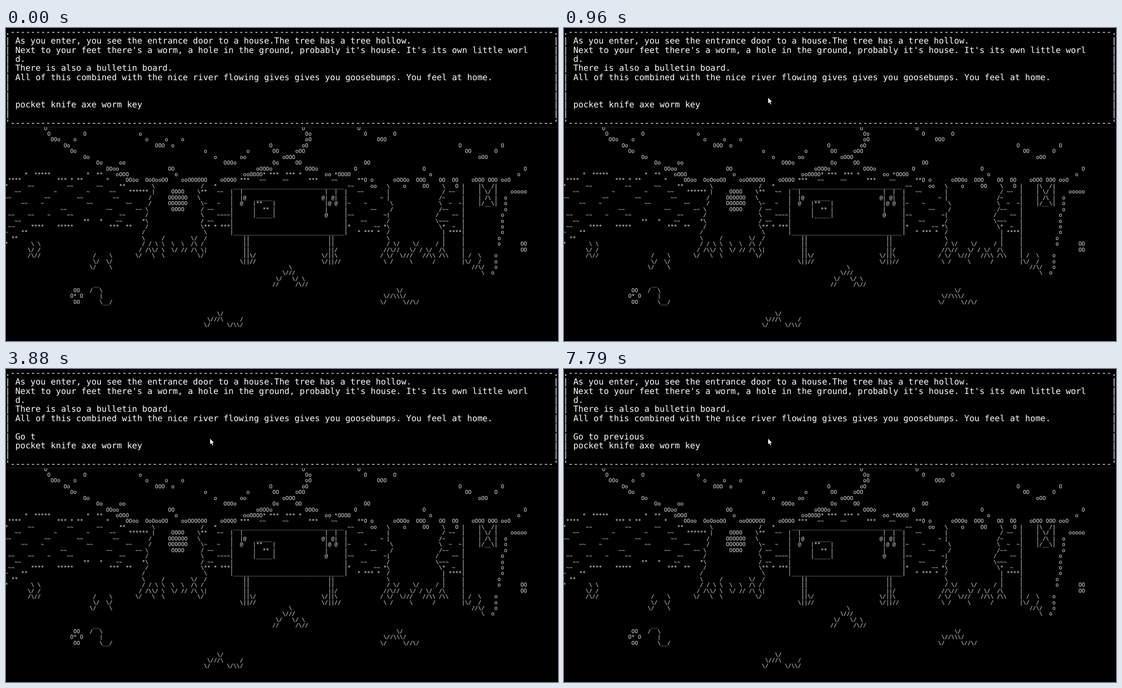
Animation, 993 px wide and 564 px high, one loop 8000 ms. Source, as an HTML page:

```html
<!DOCTYPE html>
<html lang="en">
<head>
<meta charset="utf-8">
<title>Text adventure</title>
<style>
  html, body { margin: 0; width: 100%; height: 100%; overflow: hidden; background: #000; }
  #stage { position: relative; width: 993px; height: 564px; overflow: hidden; background: #000; }
  pre {
    position: absolute; margin: 0; white-space: pre;
    font-family: "DejaVu Sans Mono", monospace;
    font-variant-ligatures: none; text-rendering: geometricPrecision;
  }
  #story { left: -1.6px; top: -1.2px; font-size: 15.18px; line-height: 16.4px; color: #fff; }
  #view { position: absolute; left: 0; top: 178px; width: 993px; height: 386px; overflow: hidden; border-top: 1px solid #222; box-sizing: border-box; }
  #scene { left: -2px; top: -2.5px; font-size: 9.763px; line-height: 10.44px; color: #e4e4e4; }
  #pointer { position: absolute; left: 0; top: 0; overflow: visible; visibility: hidden; }
</style>
</head>
<body>
<div id="stage">
  <pre id="story"></pre>
  <div id="view">
<pre id="scene">
^  O^^^^^^^^ O^        O
^   O^    O^^ o^^^^^  Oo^^O        O
^    OOo^ o^^   o     o    o^^^^  oO^^    OOO
^        Oo^^      OOO^ o^^^ O^ oO^^^^         O^  O
^^Oo^^^^ o^    o^  OO     oOO^^^^^ OO^O
^^    Oo^^^^    o^  oo^     oOOO^^^^^^     oOO
^^        Oo     oo^^^       OOOo^  Oo     OO^^OO
^^^ OOoo^^OO^^       oOOOo^  OOOo^       O^^        O^^^         O
      *  *****^     *  **    oOOO^^  o^^   ooOOOO* ***  ***^*       oo *OOOO^^^o^^       o
 ****^      *** * **^ *     OOoo  OoOooOO    ooOOOOOO    oOOOO ***   ~~     ~~^   ***^~~      **O o      oOOOo  OOO^   OO  OO^   oOOO OOO ooO
*      ~~^         ~~       ~~     **^     \^^/   *^__________________________________ ~~^  oo   \^  o     OO    \   O^|    |\  /|
   ~~^     ~^     ~^  ~~    ****** |^ OOOO    \**   ~~  |  |^^        |^ |  |   ~~       |^^    / ~~^|    | \/ |    ooooo
~~^  ~~^  ~~^   ~~^    /^OOOOOO   \         |  |@   _____^       @|^@|  |^     ~ |^^   /~^|    | /\ |  o
     ~~^ ~^     ~~^       ~~^    /^OOOOOO^\~   ~   |  @   |**^  |^        |@ @  |~^~       \^^   \  ~  ~|    |/__\|  o
^       ~~^^ ~~^~~ \^ OOOO^/ ~~     |      |  ** |^        |^    |^  ~~    /^^   /~~^|^   o
 ~~    ~~^   ~     ~~^     ~~^   /^^\    ~~~~|      |_____|^        @^    |~~^      ~|^^  /    ~~^|^  o
   ~~^^    **   *    ~~^  *\^^/ ~~     |^^^    |    ~~      /^^  \~~~^|^  o
 ~~     ****    *****^  ***  **^   /^^\** * ***|^^^    |*^   ~~ *\^^   \*  ~^|^  o
~    **^^^^  /^^ \       |__________________________________|   *^*** *  /^^    | ****|^  o
  **^^^^  \     /^       \/^ /^   ||^^         ||^       \^^    |^|^ o
*       \^\^^^  / / \ \^ \  \  /\^/^   ||^^         ||^       / \/    \/^  / |^|^ o      OO
       \/ /^^^ / /\\/ \^ \/ // /\^\|^   ||^^         ||/^      //\//   \/ / \/  /\^|^        OO
       /\//^       /^  \^\/   \  \^         \/^   ||\/^^       \/||\^     / \/^ \///   //\\ /\\^| /  \^o
^^       \/^ \/^^^^  \||//^^       \/||//^      \ /^    \^ /^|\/  /^o
^^      \/^  \^^^^^       \^^^^^^   //\/^o
^^^^^^^^     \///^^^^^^      \  o
^^^^^^^^   \/   \/ \
^^       __^^^^^^  //     /\//
^^ OO   /  \^^^^^^^^^\/
^^O* O     |^^^^^^^^      \//\\\/
^^ OO      \__/^^^^^^^^     \/^  \//\/

^^^^^^     \/
^^^^^^  \///\^  /
^^^^^^ \/     \/\\/
</pre>
  </div>
  <svg id="pointer" width="10" height="15" viewBox="0 0 10 15">
    <path d="M0 0V11.2L2.5 9L4.2 13L6.1 12.2L4.4 8.3H7.6Z" fill="#fff" stroke="#000" stroke-width=".6"/>
  </svg>
</div>
<script>
const LOOP = 8000;
const $ = id => document.getElementById(id);
const story = $('story'), scene = $('scene'), pointer = $('pointer');

// "^" jumps to the next column that is a multiple of ten
const expand = line => [...line].reduce((out, ch) =>
  ch === '^' ? out.padEnd((Math.floor(out.length / 10) + 1) * 10) : out + ch, '');
scene.textContent = scene.textContent.split('\n').map(expand).join('\n');

const command = 'Go to previous t';
// time at which each count of typed characters is reached
const typing = [
  [2540, 1], [3090, 2], [3880, 4], [4010, 5], [4610, 7], [4810, 8], [5010, 9],
  [5340, 10], [5540, 11], [5740, 12], [5940, 13], [6070, 14], [6470, 16], [7790, 14]
];

function box(typed) {
  const rule = '-'.repeat(107);
  const lines = [
    'As you enter, you see the entrance door to a house.The tree has a tree hollow.',
    "Next to your feet there's a worm, a hole in the ground, probably it's house. It's its own little worl",
    'd.',
    'There is also a bulletin board.',
    'All of this combined with the nice river flowing gives gives you goosebumps. You feel at home.',
    '', typed, 'pocket knife axe worm key', ''
  ];
  return ['.' + rule + '.', ...lines.map(s => '| ' + s.padEnd(106) + '|'), "'" + rule + "'"].join('\n');
}

function movePointer(t) {
  const step = Math.min(12, Math.floor((t - 121) / 69));
  const left = 1 - step / 12;
  const x = 367 + 585 * left ** 3.07;
  const y = 125 + 427 * left ** 3.82;
  pointer.style.visibility = t < 130 ? 'hidden' : 'visible';
  pointer.style.transform = `translate(${x}px, ${y}px)`;
}

let shown = -1;
function draw(t) {
  let count = 0;
  for (const [at, n] of typing) if (t >= at) count = n;
  if (count !== shown) {
    story.textContent = box(command.slice(0, count));
    shown = count;
  }
  movePointer(t);
}

const start = performance.now();
function tick() {
  draw((performance.now() - start) % LOOP);
  requestAnimationFrame(tick);
}
draw(0);
tick();
</script>
</body>
</html>
```
